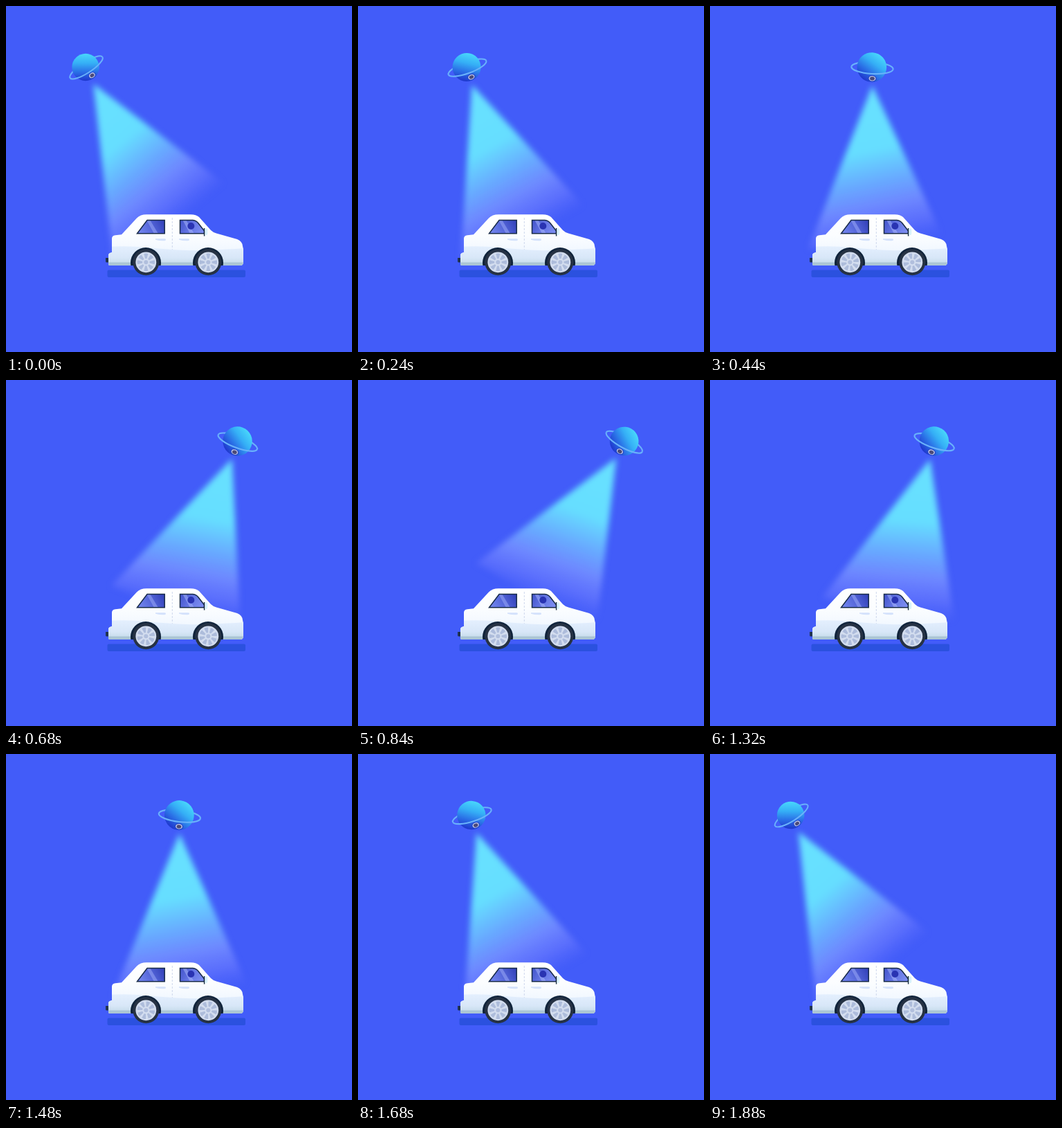
Animation of 500x500 px, one loop 1.92 s. Source, as an HTML page with a canvas:

```html
<!DOCTYPE html>
<html>
<head>
<meta charset="utf-8">
<style>
html, body { margin: 0; width: 100%; height: 100%; overflow: hidden; background: #425cf9; }
canvas { display: block; }
</style>
</head>
<body>
<canvas id="stage" width="500" height="500"></canvas>
<script>
const ctx = document.getElementById('stage').getContext('2d');
const LOOP = 1920, STEP = 40, TURN = 1000, AIMED = 940;
const BG = '#425cf9';
const rad = d => d * Math.PI / 180;
const ease = u => u * u * (3 - 2 * u);
const mix = (a, b, u) => a + (b - a) * u;

function gradient(x0, y0, x1, y1, stops) {
  const g = ctx.createLinearGradient(x0, y0, x1, y1);
  stops.forEach(([at, color]) => g.addColorStop(at, color));
  return g;
}

function disc(x, y, r, fill) {
  ctx.beginPath();
  ctx.arc(x, y, r, 0, Math.PI * 2);
  ctx.fillStyle = fill;
  ctx.fill();
}

function oval(x, y, rx, ry, fill) {
  ctx.beginPath();
  ctx.ellipse(x, y, rx, ry, 0, 0, Math.PI * 2);
  ctx.fillStyle = fill;
  ctx.fill();
}

function shape(d, fill, stroke, width) {
  const p = new Path2D(d);
  if (fill) { ctx.fillStyle = fill; ctx.fill(p); }
  if (stroke) { ctx.strokeStyle = stroke; ctx.lineWidth = width; ctx.stroke(p); }
}

// Goes 0 to 1 by `arrive`, waits for TURN, then returns by the end of the loop
function swing(t, arrive) {
  return t < TURN ? ease(Math.min(1, t / arrive)) : 1 - ease((t - TURN) / (LOOP - TURN));
}

// Where the planet is, and how it and its beam are turned
function pose(t) {
  const p = swing(t, TURN);
  const tilt = p < 0.43 ? mix(-33, 5, p / 0.43) : mix(5, 32, (p - 0.43) / 0.57);
  return {
    x: mix(115, 404.5, p),
    y: 88.5,
    tilt,
    aim: mix(-29.5, 31.8, swing(t, AIMED)),
    scale: 1 - (p < 0.5 ? 0.32 : 0.14) * (p - 0.5) ** 2
  };
}

function drawBeam(o) {
  const a = rad(o.aim * 0.85), len = 233, half = Math.tan(rad(23.2)) * len;
  ctx.save();
  ctx.filter = 'blur(4.5px)';
  ctx.translate(o.x - Math.sin(a) * 26.5, o.y + Math.cos(a) * 26.5);
  ctx.rotate(rad(o.aim));
  const gx = Math.sin(rad(10)) * len, gy = Math.cos(rad(10)) * len;
  ctx.fillStyle = gradient(0, 0, gx, gy, [
    [0, '#68e2ff'], [0.39, '#66deff'], [0.59, 'rgb(104,170,255)'],
    [0.74, 'rgba(112,138,255,.95)'], [0.87, 'rgba(108,124,255,.6)'],
    [1, 'rgba(96,112,255,0)']
  ]);
  ctx.beginPath();
  ctx.moveTo(0, 0);
  ctx.lineTo(half, len);
  ctx.lineTo(-half, len);
  ctx.fill();
  ctx.restore();
}

function drawRing(from, to) {
  ctx.beginPath();
  ctx.ellipse(0.7, 1, 30.3, 8.5, 0, from, to);
  ctx.strokeStyle = '#69b2fb';
  ctx.lineWidth = 2.2;
  ctx.stroke();
}

function drawPlanet(o) {
  ctx.save();
  ctx.translate(o.x, o.y);
  ctx.rotate(rad(o.tilt));
  ctx.scale(o.scale, o.scale);
  drawRing(Math.PI, Math.PI * 2);
  const gx = Math.sin(rad(33)) * 21, gy = -Math.cos(rad(33)) * 21;
  disc(0, 0, 21.4, gradient(gx, gy, -gx, -gy, [
    [0, '#48d6fb'], [0.35, '#35aff6'], [0.68, '#2a6fe6'], [1, '#1f38cd']
  ]));
  oval(1.6, 16.2, 6.2, 4.7, '#2343c4');
  oval(1.6, 16.2, 5, 3.8, '#b9c1e6');
  oval(1.6, 16.4, 3.4, 2.6, '#4b4a78');
  drawRing(0, Math.PI);
  ctx.restore();
}

function drawWheel(x, spin) {
  const y = 370.3;
  disc(x, y, 19, '#263244');
  disc(x, y, 14.9, '#d3ddef');
  ctx.save();
  ctx.translate(x, y);
  ctx.rotate(spin);
  for (let i = 0; i < 8; i++) {
    ctx.rotate(Math.PI / 4);
    shape('M-1.2 -5.2L-3 -12.2Q0 -13.6 3 -12.2L1.2 -5.2Z', '#adbcdb');
  }
  ctx.restore();
  disc(x, y, 3, '#b1bfdd');
}

function drawWindow(d, x0, x1, fill, shine) {
  shape(d, fill);
  ctx.save();
  ctx.clip(new Path2D(d));
  shape(`M${x0} 309h5l12 20h-6Z`, shine);
  ctx.restore();
  shape(d, null, '#172a49', 1.5);
}

function drawCar(spin) {
  ctx.beginPath();
  ctx.roundRect(146.5, 381.5, 199.5, 10.5, 2);
  ctx.fillStyle = '#2b51df';
  ctx.fill();

  shape('M144 364h6v6.5h-5Q144 370 144 369Z', '#203350');
  const body = 'M150 375Q148 375 148 372V360Q148 357 153 356V336Q153 332 158 331.3L167 330.3' +
    'L189 306.5Q194 301.2 203 301.2H267Q275 301.2 279 305L296 324Q299 327 304 328.5' +
    'L334 337Q341.5 340 342 347L342.9 351V371Q342.5 375 338.5 375Z';
  shape(body, gradient(0, 301, 0, 352, [[0, '#ffffff'], [0.6, '#fbfdff'], [1, '#f2f8ff']]));
  ctx.save();
  ctx.clip(new Path2D(body));
  shape('M145 348Q175 346 205 349T260 353T345 350V376H145Z',
    gradient(0, 347, 0, 375, [[0, '#e4effe'], [0.6, '#d8e7f8'], [1, '#c0d7e6']]));
  shape('M145 370.5H345V376H145Z', '#abc5d4');
  disc(202, 371, 22, '#10233a');
  disc(292, 371, 22, '#10233a');
  ctx.restore();

  ctx.setLineDash([3, 2]);
  shape('M240.3 306V352', null, '#cdd7ed', 1);
  ctx.setLineDash([]);

  drawWindow('M204 309.5H229.2V328.8H189.5Z', 203, 229,
    gradient(195, 328, 227, 311, [[0, '#6f82ec'], [0.5, '#5364d8'], [1, '#3443bb']]),
    'rgba(160,174,250,.5)');
  const front = 'M251.5 309.5H270Q275 310 278 314L286.5 325V328.8H251.5Z';
  drawWindow(front, 255, 287,
    gradient(253, 311, 282, 328, [[0, '#4657cd'], [0.5, '#6475e4'], [1, '#7b8cf0']]),
    'rgba(170,184,252,.5)');
  disc(267.3, 318, 5, '#2933b2');
  shape('M286.6 321V332.5', null, '#14283e', 1.5);
  shape('M287.5 321.5h2q1.8 0 1.8 2v5q0 2.5-2 2.5h-1.8Z', '#d9f3fb');

  [216, 250].forEach(x =>
    shape(`M${x} 336.3h13q2 0 2 1.4t-2 1.6q-8 .2-13-1.5Z`, '#d3e1fb'));

  drawWheel(202.3, spin);
  drawWheel(292.3, spin);
}

function draw(t) {
  const o = pose(t);
  ctx.fillStyle = BG;
  ctx.fillRect(0, 0, 500, 500);
  drawBeam(o);
  drawPlanet(o);
  drawCar(t / LOOP * Math.PI * 4);
}

const start = performance.now();
function tick() {
  const t = (performance.now() - start) % LOOP;
  draw(Math.floor(t / STEP) * STEP);
  requestAnimationFrame(tick);
}
tick();
</script>
</body>
</html>
```
